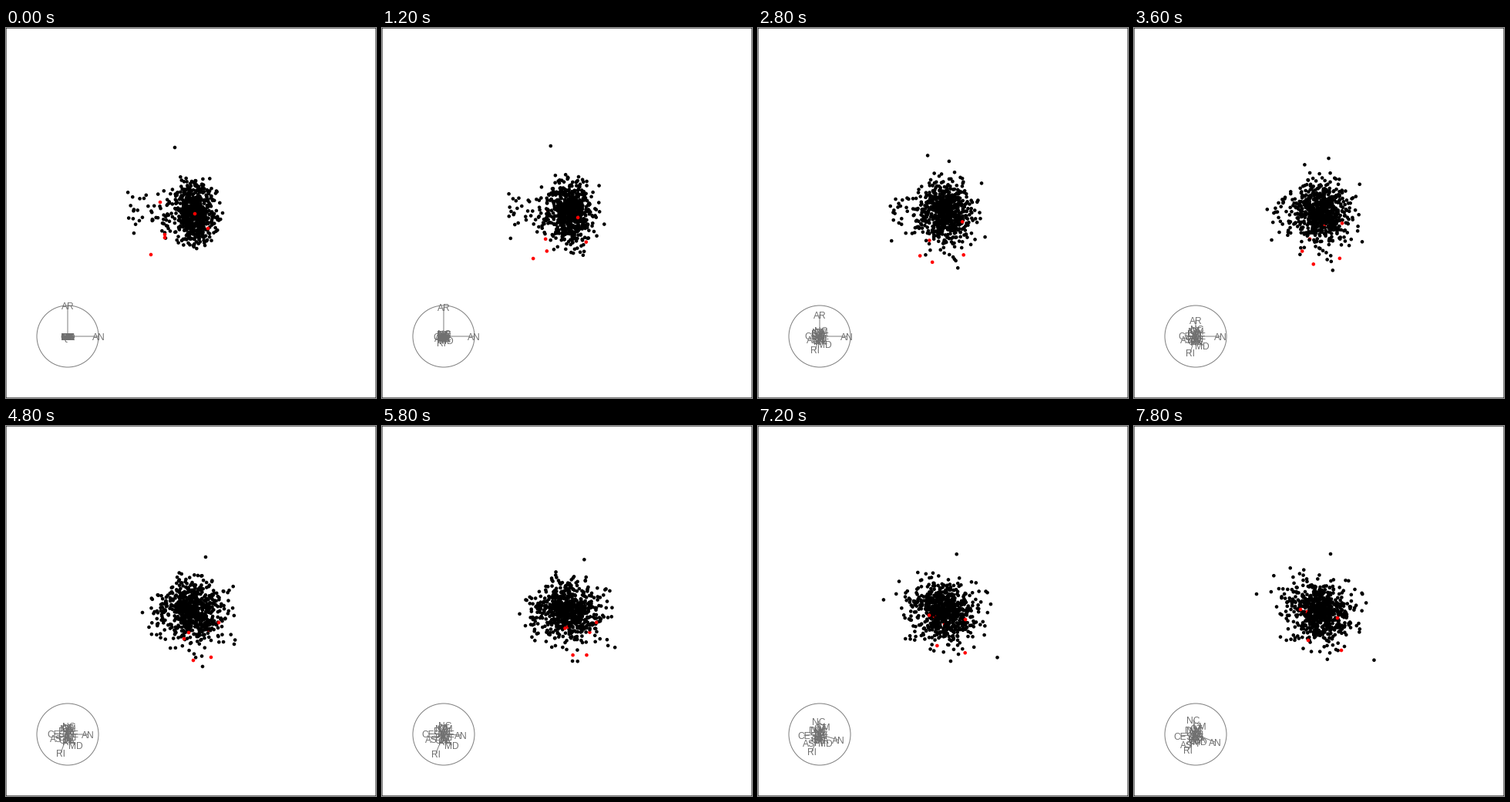
A matplotlib script that plays this animation: 480x480 px, repeating every 8000 ms.

```python
import numpy as np
import matplotlib.pyplot as plt
from matplotlib.animation import FuncAnimation
from matplotlib.collections import LineCollection
from matplotlib.patches import Circle, Rectangle

SIZE, DPI = 480, 100
PX = 72 / DPI
FRAMES, STEP = 40, 200
MID = np.array([240.0, 240.0])
HUB = np.array([80.0, 400.0])

# The projection turns along one geodesic until TURN, then along a second one.
RATE = np.array([0.18, 0.28])
TURN, RATE2 = 5.6, 0.25
KEY1, KEY2 = 4.8, 7.8


def first_leg(p, d, t):
    return p * np.cos(RATE * t) + d * np.sin(RATE * t)


def project(parts, t):
    p, d, e = parts
    pos = first_leg(p, d, min(t, TURN))
    if t > TURN:
        a = RATE2 * (t - TURN)
        pos = pos * np.cos(a) + e * np.sin(a)
    return pos


def solve(keys):
    """Turn offsets at 0, KEY1 and KEY2 into the three turning components."""
    p, k1, k2 = np.split(np.asarray(keys, float), 3, axis=1)
    d = (k1 - p * np.cos(RATE * KEY1)) / np.sin(RATE * KEY1)
    a = RATE2 * (KEY2 - TURN)
    e = (k2 - first_leg(p, d, TURN) * np.cos(a)) / np.sin(a)
    return p, d, e


def cloud(n, rng):
    """Clipped normal cloud with a tail to the left and one to the upper left."""
    z = rng.normal(size=(3, 3 * n, 2))
    z = z[:, (np.hypot(z[..., 0], z[..., 1]) < 2.6).all(axis=0)][:, :n]
    z[:, -30:] *= 1.35
    p = z[0] * [14.5, 18.5] + [4, -1]
    d = z[1] * [24, 20] + [-1, 0]
    e = z[2] * [18, 20] + [1, 3]
    left, top = slice(0, 40), slice(40, 68)
    p[left, 0] = rng.uniform(-84, -28, 40)
    p[left, 1] *= 0.8
    d[left] = d[left] * 0.6 + [16, 0]
    e[top] = e[top] * 0.8 + [-45, -45]
    return p, d, e


# Offsets from the middle of the stage: red points, then the farthest black ones
red = solve([
    [-40, -14, 23, 25, -10, 12],
    [-34, 28, -3, 28, -16, 1],
    [-52, 54, -9, 36, -24, -2],
    [-34, 32, 3, 64, -14, 38],
    [22, 20, 26, 60, 29, 51],
    [5, 1, 36, 15, 24, 9],
])
far = solve([
    [-21, -85, -16, -39, -18, -25],
    [-9, -30, 19, -70, 15, -74],
    [41, 0, 56, 43, 33, 46],
    [-61, -19, -63, 2, -81, -22],
    [21, 35, 15, 72, 22, 50],
])
rng = np.random.default_rng(12)
bulk = cloud(700, rng)
# Two of the red points lie under part of the cloud.
dots = [np.vstack([r[:1], b[:420], r[1:2], b[420:], f, r[2:]])
        for r, b, f in zip(red, bulk, far)]
colors = np.full(len(dots[0]), "black", dtype="<U5")
colors[[0, 421, -4, -3, -2, -1]] = "red"

# Axis ends that stand clear of the knot; the others stay near the hub.
names = "AN AR RI MD CE AS NC".split()
main = solve([
    [40, 0, 26, 0, 25, 10],
    [0, -40, 0, -9, 2, 2],
    [0, 0, -9, 24, -10, 20],
    [0, 0, 10, 14, 5, 9],
    [0, 0, -18, -1, -20, 2],
    [0, 0, -15, 5, -12, 13],
    [0, 0, 2, -11, -3, -19],
])
small = "QT CM VI ME MI BE RA PI GA LA SA DA NA".split()
names += small
angle = 2 * np.pi * np.arange(len(small)) / len(small)
ring = np.stack([6 * np.sin(angle), -9 * np.cos(angle)], axis=1)
knot = [0 * ring, ring, rng.normal(0, 5, ring.shape)]
arms = [np.vstack(pair) for pair in zip(main, knot)]

fig = plt.figure(figsize=(SIZE / DPI, SIZE / DPI), dpi=DPI, facecolor="white")
ax = fig.add_axes([0, 0, 1, 1])
ax.set(xlim=(0, SIZE), ylim=(SIZE, 0))
ax.axis("off")
ax.add_patch(Rectangle((0, 0), SIZE, SIZE, fill=False, ec="black", lw=PX, snap=False))
ax.add_patch(Circle(HUB, 40, fill=False, ec="#7f7f7f", lw=PX))
spokes = ax.add_collection(
    LineCollection([], colors="#7f7f7f", linewidths=PX, snap=False))
labels = [ax.text(0, 0, name, family="Liberation Sans", size=12 * PX, color="#707070",
                  ha="center", va="baseline", zorder=3) for name in names]
points = ax.scatter(*MID[:, None].repeat(len(colors), 1), s=(4.6 * PX) ** 2,
                    c=colors, linewidths=0, zorder=2)


def draw(i):
    t = i * STEP / 1000
    points.set_offsets(MID + project(dots, t))
    ends = HUB + project(arms, t)
    spokes.set_segments([[HUB, end] for end in ends])
    for label, (x, y) in zip(labels, ends):
        label.set_position((x, y + 5))
    return [points, spokes, *labels]


anim = FuncAnimation(fig, draw, frames=FRAMES, interval=STEP, repeat=True,
                     repeat_delay=0, blit=False)
plt.show()
```
